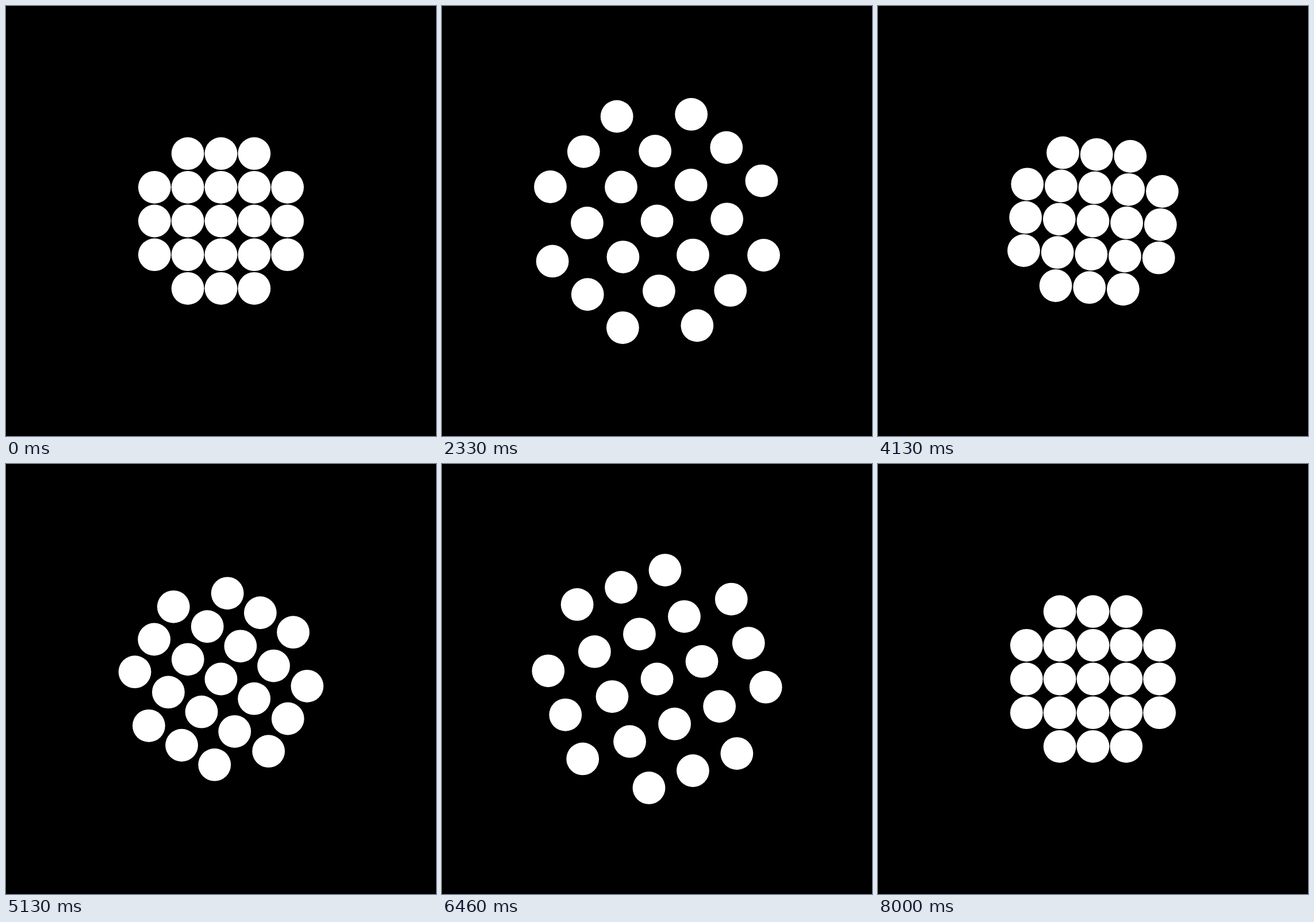
These frames come from a looping animation (748 px wide and 748 px high, 8060 ms). An HTML page with a canvas:

```html
<!DOCTYPE html>
<html lang="en">
<head>
<meta charset="utf-8">
<title>Dots</title>
<style>
  html, body { margin: 0; width: 100%; height: 100%; overflow: hidden; background: #000; }
  canvas { display: block; width: 748px; height: 748px; }
</style>
</head>
<body>
<canvas id="stage" width="748" height="748"></canvas>
<script>
const ctx = document.getElementById('stage').getContext('2d');
const SIZE = 748, MID = SIZE / 2, RADIUS = 28.4, GAP = 58.25;
const LOOP = 8060, HALF = 4000, PEAK = 2033, FALL = 1800;
const INNER = 30, EDGE = 28, OUTER = 64;

// Outward travel along one axis; dots in an outer row spread sideways a little less
function reach(along, across) {
  if (Math.abs(along) === 2) return Math.sign(along) * OUTER;
  return along * (Math.abs(across) === 2 ? EDGE : INNER);
}

const dots = [];
for (let row = -2; row <= 2; row++) {
  for (let col = -2; col <= 2; col++) {
    if (col * col + row * row > 5) continue;
    dots.push({ col, row, dx: reach(col, row), dy: reach(row, col) });
  }
}

// The picture steps at 15 per second, on 10 ms ticks
function stepTime(ms) {
  const tick = Math.floor((ms % LOOP) / 10);
  return (Math.ceil(3 * (tick + 1) / 20) - 1) * 1000 / 15;
}

// Half a turn: eases in, flows through the middle, eases out
function turn(t) {
  const ease = s => 2 * s * s - s * s * s;
  const half = Math.PI / 2;
  return t < HALF ? half * ease(t / HALF) : Math.PI - half * ease((2 * HALF - t) / HALF);
}

// Two pulses: accelerating spread, smooth return
function spread(t) {
  const second = t >= HALF;
  const u = second ? t - HALF : t;
  if (u < PEAK) return Math.pow(u / PEAK, second ? 2.16 : 1.53);
  const s = Math.min(1, (u - PEAK) / FALL);
  return 1 - s * s * (3 - 2 * s);
}

function draw(t) {
  const angle = turn(t), p = spread(t);
  const cos = Math.cos(angle), sin = Math.sin(angle);
  const skew = 0.42 * (1 - p);
  ctx.fillStyle = '#000';
  ctx.fillRect(0, 0, SIZE, SIZE);
  ctx.fillStyle = '#fff';
  for (const { col, row, dx, dy } of dots) {
    const x = col * (GAP - skew) + dx * p;
    const y = row * (GAP + skew) + dy * p;
    ctx.beginPath();
    ctx.arc(MID + x * cos - y * sin, MID + x * sin + y * cos, RADIUS, 0, 2 * Math.PI);
    ctx.fill();
  }
}

const start = performance.now();
function tick() {
  draw(stepTime(performance.now() - start));
  requestAnimationFrame(tick);
}
tick();
</script>
</body>
</html>
```
